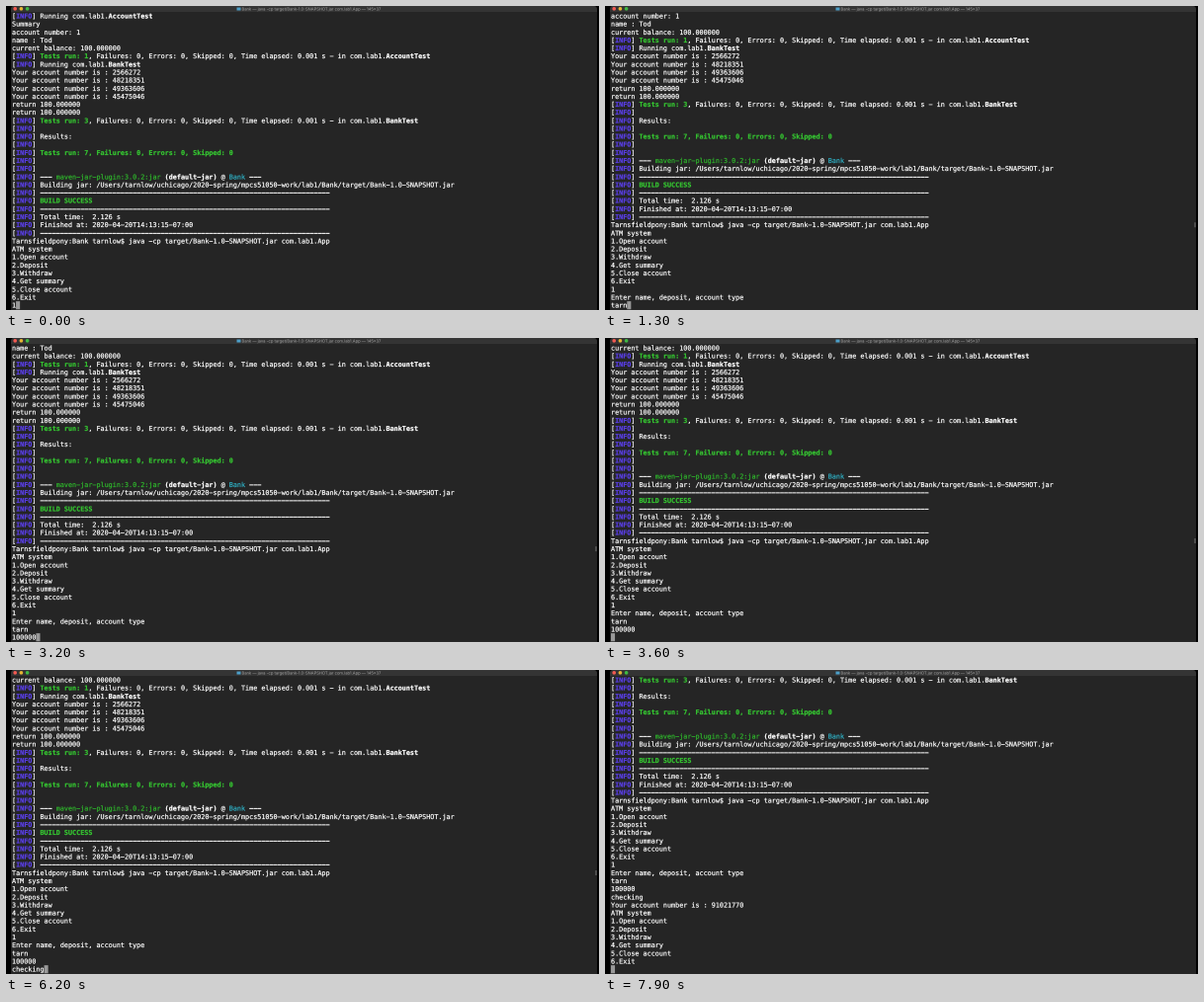
Animation, 600 px wide and 308 px high, one loop 8000 ms. Source, as an HTML page with a canvas:

```html
<!DOCTYPE html>
<html lang="en">
<head>
<meta charset="utf-8">
<title>Terminal session</title>
<style>
  html, body { margin: 0; width: 100%; height: 100%; overflow: hidden; background: #000; }
  canvas { display: block; width: 600px; height: 308px; }
</style>
</head>
<body>
<canvas width="1200" height="616"></canvas>
<script>
const ctx = document.querySelector('canvas').getContext('2d');
const LOOP = 8000, ROWS = 37;
const LEFT = 6, TOP = 6.1, CELL_W = 4.07, CELL_H = 8.14, BASELINE = 6.4;

// "~x" inside a line switches to style x: [weight, colour]
const STYLES = {
  w: ['', '#ffffff'],
  B: ['bold', '#ffffff'],
  g: ['', '#2fb62c'],
  G: ['bold', '#35c431'],
  c: ['', '#2fb0c4'],
  v: ['bold', '#5a3fe8'],
};

const info = (text = '') => `[~vINFO~w] ${text}`;
const rule = info('~B' + '-'.repeat(72));
const accountNumber = n => `Your account number is : ${n}`;
const testRun = (count, name) => info(`~GTests run: ${count}~w, Failures: 0, Errors: 0, ` +
  `Skipped: 0, Time elapsed: 0.001 s - in com.lab1.~B${name}`);
const menu = ['ATM system', '1.Open account', '2.Deposit', '3.Withdraw',
  '4.Get summary', '5.Close account', '6.Exit', ''].join('\n');

const history = [
  info('Running com.lab1.~BAccountTest'),
  'Summary',
  'account number: 1',
  'name : Tod',
  'current balance: 100.000000',
  testRun(1, 'AccountTest'),
  info('Running com.lab1.~BBankTest'),
  ...[2566272, 48218351, 49363606, 45475046].map(accountNumber),
  'return 100.000000',
  'return 100.000000',
  testRun(3, 'BankTest'),
  info(),
  info('Results:'),
  info(),
  info('~GTests run: 7, Failures: 0, Errors: 0, Skipped: 0'),
  info(),
  info(),
  info('~B--- ~gmaven-jar-plugin:3.0.2:jar ~B(default-jar)~w @ ~cBank~B ---'),
  info('Building jar: /Users/tarnlow/uchicago/2020-spring/mpcs51050-work/lab1/Bank/target/Bank-1.0-SNAPSHOT.jar'),
  rule,
  info('~GBUILD SUCCESS'),
  rule,
  info('Total time:  2.126 s'),
  info('Finished at: 2020-04-20T14:13:15-07:00'),
  rule,
  'Tarnsfieldpony:Bank tarnlow$ java -cp target/Bank-1.0-SNAPSHOT.jar com.lab1.App',
  menu + '1',
].join('\n');
const PROMPT_ROW = 28;

const typed = (word, times) => times.map((time, i) => [time, word[i]]);
const events = [
  [100, '\nEnter name, deposit, account type\n'],
  ...typed('tarn', [800, 900, 1000, 1100]),
  [1500, '\n'],
  ...typed('100000', [2400, 2500, 2700, 2900, 3000, 3200]),
  [3600, '\n'],
  ...typed('checking', [4800, 5000, 5300, 5500, 5700, 5900, 6000, 6200]),
  [6400, `\n${accountNumber(91021770)}\n${menu}`],
];

function rect(color, x, y, w, h, radii = 0) {
  ctx.fillStyle = color;
  ctx.beginPath();
  ctx.roundRect(x, y, w, h, radii);
  ctx.fill();
}

function drawWindow() {
  rect('#000', 0, 0, 600, 308);
  rect('#252525', 5, 0, 593, 308, [3, 3, 0, 0]);
  rect('#343434', 5, 0, 593, 6, [3, 3, 0, 0]);
  ['#f25a52', '#e5b433', '#3fb943'].forEach((color, i) => {
    rect(color, 7.4 + i * 6.2, 1, 3.6, 3.6, 1.8);
  });
  rect('#4c9fc8', 233.5, 1.5, 4, 3);
  ctx.font = '4.12px Inter, sans-serif';
  ctx.fillStyle = '#a8a8a8';
  ctx.fillText('Bank — java -cp target/Bank-1.0-SNAPSHOT.jar com.lab1.App — 145×37', 238.5, 4.3);
}

// Characters sit on the terminal grid; returns the column after the last one
function drawLine(line, row) {
  const y = TOP + row * CELL_H + BASELINE;
  let col = 0;
  for (const part of ('w' + line).split('~')) {
    const [weight, color] = STYLES[part[0]];
    ctx.font = `${weight} 6.76px "DejaVu Sans Mono", monospace`;
    ctx.fillStyle = ctx.strokeStyle = color;
    // The minus sign gives the wide hyphens of this terminal
    for (const char of part.slice(1).replaceAll('-', '−')) {
      const x = LEFT + col++ * CELL_W;
      ctx.fillText(char, x, y);
      ctx.strokeText(char, x, y);
    }
  }
  return col;
}

function draw(output) {
  const lines = output.split('\n');
  const scroll = lines.length - ROWS;

  drawWindow();
  let cursor = 0;
  lines.slice(scroll).forEach((line, row) => { cursor = drawLine(line, row); });
  rect('#999', LEFT + cursor * CELL_W, TOP + (ROWS - 1) * CELL_H, CELL_W, CELL_H);
  if (scroll > 0 && scroll < 13) {
    rect('#777', 596.5, TOP + (PROMPT_ROW - scroll) * CELL_H + 1.5, 1, 5);
  }
}

let shown;
function frame() {
  const time = performance.now() % LOOP;
  const output = history + events.filter(([at]) => at <= time).map(([, text]) => text).join('');
  if (output !== shown) draw(shown = output);
  requestAnimationFrame(frame);
}

ctx.scale(2, 2);
ctx.lineWidth = 0.22;
ctx.lineJoin = 'round';
ctx.textRendering = 'geometricPrecision';
frame();
</script>
</body>
</html>
```
